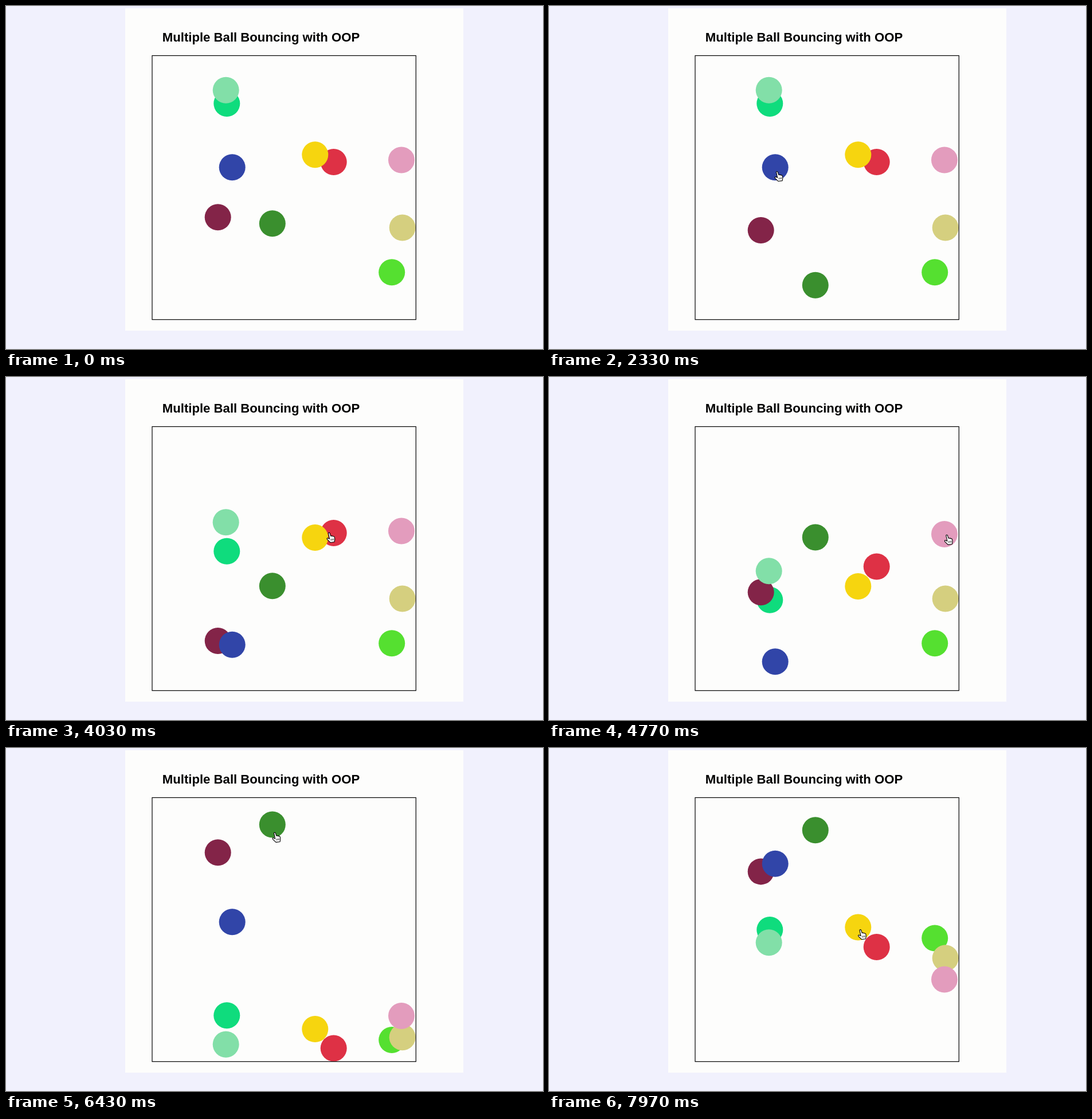
Recreate the animation shown at these times as an HTML page. Size 937x598 px, loop 8000 ms.

```html
<!DOCTYPE html>
<html lang="en">
<head>
<meta charset="utf-8">
<title>Multiple Ball Bouncing with OOP</title>
<style>
  html, body { margin: 0; width: 100%; height: 100%; overflow: hidden; background: #f1f1fd; }
  svg { display: block; width: 100%; height: 100%; }
  text { font: bold 22.15px "Liberation Sans", Arial, sans-serif; }
</style>
</head>
<body>
<svg viewBox="0 0 937 598">
  <rect x="208" y="4" width="590" height="562" fill="#fdfdfc"/>
  <text x="272.8" y="62">Multiple Ball Bouncing with OOP</text>
  <g id="balls"></g>
  <rect x="255" y="86.5" width="460.3" height="460.2" fill="none" stroke="#000" stroke-width="1.2"/>
  <g id="cursor" stroke-linejoin="round">
    <path id="arrow" d="M0 0V13.5L3 10.7 5.2 15.5 7.4 14.5 5.3 9.8H9.6Z" stroke="#fff" stroke-width=".8"/>
    <g id="hand" fill="#fff" stroke="#000" stroke-width="1.1">
      <path d="M-1.3 1Q0-.8 1.4 1L2.9 6Q4.3 5 5.1 6.3 6.6 5.5 7.4 6.8 9 6.3 9.5 8L10 11.5 9.3 16.3 2.2 17.2-3 12.2Q-4.6 10 -2.6 9.4L.8 11Z"/>
      <path d="M3.4 11v3M5.6 10.7v3M7.7 10.4v3" stroke-width=".8"/>
    </g>
  </g>
</svg>
<script>
const LOOP = 8000, FRAME = 100 / 3;
const RADIUS = 23, TOP = 110, FLOOR = 524, SPEED = 0.1158;
const GRIP = 4;       // pointer offset from the centre of a clicked ball
const TRAVEL = 0.75;  // share of the time between clicks spent moving
const $ = id => document.getElementById(id);

// A click starts a falling ball; a second click stops it.
class Ball {
  constructor(x, y, color, start, stop = LOOP) {
    Object.assign(this, { x, y, start, stop });
    this.node = document.createElementNS('http://www.w3.org/2000/svg', 'circle');
    this.node.setAttribute('cx', x);
    this.node.setAttribute('r', RADIUS);
    this.node.setAttribute('fill', color);
    $('balls').append(this.node);
  }

  yAt(t) {
    const span = FLOOR - TOP;
    const moving = Math.max(0, Math.min(t, this.stop) - this.start);
    const phase = (this.y - TOP + SPEED * moving) % (2 * span);
    return FLOOR - Math.abs(span - phase);
  }

  clickAt(time) {
    return { time, x: this.x + GRIP, y: this.yAt(time) + GRIP };
  }
}

// Back to front
const balls = [
  new Ball(385.3, 170, '#0fdc7d', 2878, 7723),
  new Ball(369.7, 368.3, '#832448', 2137),
  new Ball(394.7, 281.3, '#3145a8', 2432, 7311),
  new Ball(383.7, 146.7, '#82dfa8', 3113),
  new Ball(464.8, 379.2, '#3a8f2e', 1404, 6516),
  new Ball(571.7, 272, '#de3145', 4261),
  new Ball(539.3, 259.2, '#f6d50f', 3854, 7967),
  new Ball(673.2, 464.2, '#55e030', 5788),
  new Ball(691.7, 386.5, '#d5cf7f', 5417),
  new Ball(690, 268.4, '#e39cbd', 4719)
];

// The pointer comes in, then visits the balls in the order of their clicks.
const visits = balls
  .flatMap(ball => [ball.start, ball.stop].filter(t => t < LOOP).map(t => ball.clickAt(t)))
  .concat({ time: 1000, x: 540, y: 330 })
  .sort((a, b) => a.time - b.time);

function pointerAt(t) {
  const next = visits.findIndex(v => v.time > t);
  if (next === 0) return null;
  if (next < 0) return visits.at(-1);
  const from = visits[next - 1], to = visits[next];
  const u = Math.min(1, (t - from.time) / (to.time - from.time) / TRAVEL);
  const eased = u * u * (3 - 2 * u);
  const mix = key => from[key] + (to[key] - from[key]) * eased;
  return { x: mix('x'), y: mix('y') };
}

const show = (id, visible) => { $(id).style.display = visible ? '' : 'none'; };

function render(time) {
  const t = Math.floor((time % LOOP + 5) / FRAME) * FRAME;
  const tip = pointerAt(t);
  for (const ball of balls) ball.node.setAttribute('cy', ball.yAt(t));
  show('cursor', tip);
  if (!tip) return;
  const hovering = balls.some(b => Math.hypot(tip.x - b.x, tip.y - b.yAt(t)) < RADIUS);
  $('cursor').setAttribute('transform', `translate(${tip.x} ${tip.y})`);
  show('hand', hovering);
  show('arrow', !hovering);
}

const began = performance.now();
function tick() {
  render(performance.now() - began);
  requestAnimationFrame(tick);
}
tick();
</script>
</body>
</html>
```
